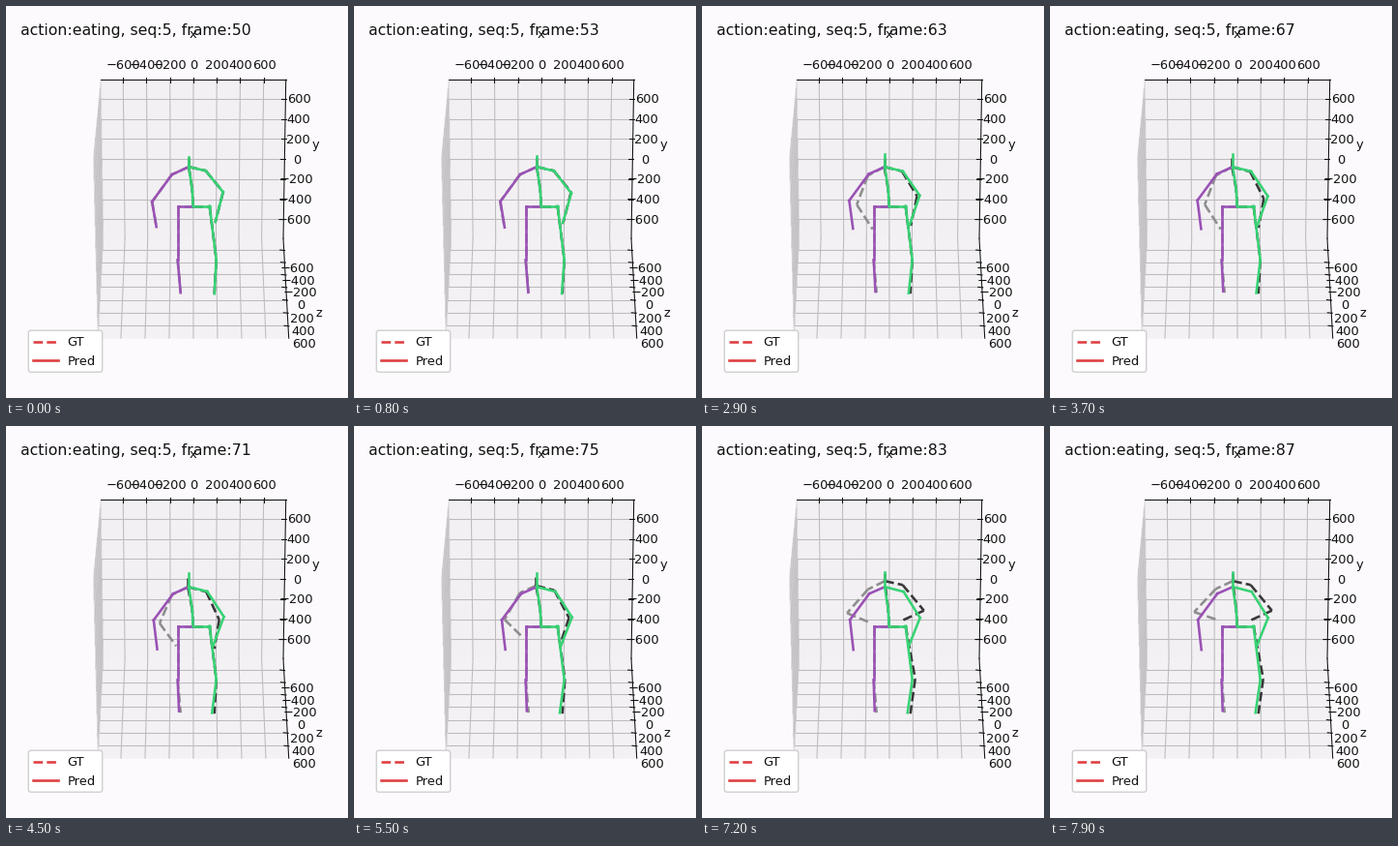
These frames come from a looping animation (354x405 px, 8000 ms). A matplotlib script:

```python
import numpy as np
import matplotlib.pyplot as plt
from matplotlib.animation import FuncAnimation
from matplotlib.patches import FancyBboxPatch, Polygon

W, H, DPI = 354, 405, 100
STEP, FRAMES = 100, 80
LOOP = STEP * FRAMES
PT = 72 / DPI
SMALL, LARGE = 13 * PT, 15.7 * PT
THIN, THICK = 1.05 * PT, 2.6 * PT
GRID, INK, RED = "#bdbbbe", "#111111", "#de3f42"
DASH = (0, (3.7, 1.6))

plt.rcParams["font.family"] = "DejaVu Sans"
fig = plt.figure(figsize=(W / DPI, H / DPI), dpi=DPI, facecolor="#fcfafd")
ax = fig.add_axes([0, 0, 1, 1])
ax.set_xlim(0.3, W + 0.3)
ax.set_ylim(H - 0.2, -0.2)
ax.axis("off")


def line(p, q, color=GRID, width=THIN, **kw):
    return ax.plot([p[0], q[0]], [p[1], q[1]], color=color, lw=width, **kw)[0]


def label(x, y, s, size=SMALL, ha="center"):
    return ax.text(x, y, s, fontsize=size, ha=ha, va="baseline",
                   color=INK, zorder=8)


def mix(p, q, f):
    return tuple(np.add(p, np.multiply(f, np.subtract(q, p))))


# Room corners: back wall, floor front edge, near top of the side wall
TL, TR = (98.5, 76), (290, 76)
BL, BR = (101, 240), (287.3, 240)
FL, FR = (95.5, 343), (293, 343)
NEAR = (90.8, 157)

ticks = np.arange(-600, 601, 200)
frac = (ticks + 790) / 1580
deep = frac - 0.05 * frac * (1 - frac)

for corners, color in (((TL, TR, BR, BL), "#f2f0f3"),
                       ((BL, BR, FR, FL), "#f3f1f4"),
                       ((TL, BL, FL, NEAR), "#dddbde")):
    ax.add_patch(Polygon(corners, fc=color, ec=color, lw=0.5, zorder=0))

for f, d in zip(frac, deep):
    line(mix(TL, TR, f), mix(BL, BR, f))
    line(mix(BL, BR, f), mix(FL, FR, f))
    line(mix(TL, BL, f), mix(TR, BR, f))
    line(mix(BL, FL, d), mix(BR, FR, d))
    line(mix(TL, BL, f), mix(NEAR, FL, f), alpha=0.6)
    line(mix(TL, NEAR, d), mix(BL, FL, d), alpha=0.6)

for p, q in ((TL, TR), (TR, BR), (BR, FR)):
    line(p, q, INK, zorder=3)


def number(v):
    return str(v).replace("-", "\u2212")


for i, (v, f, d) in enumerate(zip(ticks, frac, deep)):
    x, y = mix(TL, TR, f)
    line((x, y - 2), (x, y + 3), INK, zorder=3)
    label(194.6 + 24.4 * (i - 3), 65, number(v))

    x, y = mix(TR, BR, f)
    line((x - 4, y), (x + 1, y), INK, zorder=3)
    label(304 - 5 * i / 6, y + 4.5, number(-v))

    x, y = mix(BR, FR, d)
    line((x - 4, y), (x + 1, y + 0.5), INK, zorder=3)
    label(302 + 7 * i / 6, y + 23, number(v))

label(194, 33, "x")
label(321, 147, "y")
label(324, 321, "z")
title = label(15.5, 29.7, "", LARGE, "left")

ax.add_patch(FancyBboxPatch((26, 337.5), 71.5, 38, zorder=6,
                            boxstyle="round,pad=2.5,rounding_size=2.5",
                            fc="white", ec="#cccccc", lw=1.3 * PT))
for y, name, style in ((346.3, "GT", DASH), (366, "Pred", "-")):
    line((28.5, y), (54, y), RED, THICK, ls=style, zorder=7)
    label(64, y + 4.8, name, ha="left")

# Starting pose, and how far each movement carries a joint
REST = dict(
    pelvis=(194, 206.5), spine=(193, 189), neck=(189.5, 166), head=(189.5, 156),
    r_hip=(178, 206.5), r_knee=(178, 262), r_ankle=(181, 296),
    l_hip=(211, 206.5), l_knee=(218, 262), l_ankle=(216, 297),
    r_shoulder=(172, 174), r_elbow=(151.5, 202), r_wrist=(156, 228),
    l_shoulder=(207, 170), l_elbow=(225, 192), l_wrist=(217, 223))
DRIFT = dict(head=(0, -5), r_shoulder=(1.5, -1), r_elbow=(2, -2),
             r_wrist=(1, 3), l_shoulder=(2, 1), l_elbow=(1, 6),
             l_wrist=(-3, 5), r_ankle=(-2, -2), l_ankle=(-3, -1))
REACH = dict(head=(-1, 1), neck=(-1, 0), r_shoulder=(0, 1), r_elbow=(9, 3),
             r_wrist=(21, 2.5), l_shoulder=(0.5, 1), l_elbow=(-4, 8),
             l_wrist=(-1, 7))
LIFT = dict(head=(1, -5), neck=(1, -6), r_shoulder=(0, -7), r_elbow=(-11, -13),
            r_wrist=(-5, -31), l_shoulder=(0.5, -7), l_elbow=(9, -9.5),
            l_wrist=(-9, -29), l_knee=(3, -1))

RIGHT = ("pelvis r_hip r_knee r_ankle", "neck r_shoulder r_elbow r_wrist")
LEFT = ("pelvis l_hip l_knee l_ankle", "pelvis spine neck head",
        "neck l_shoulder l_elbow l_wrist")


def ease(t, start, end):
    u = np.clip((t - start) / (end - start), 0, 1)
    return u * u * (3 - 2 * u)


def moved(name, *moves):
    p = np.array(REST[name], float)
    for offsets, amount in moves:
        p += amount * np.array(offsets.get(name, (0, 0)))
    return p


def guess_joint(name, t):
    return moved(name, (DRIFT, 1 - (1 - t / LOOP) ** 2))


def true_joint(name, t):
    if name.startswith("r_"):
        reach, lift = ease(t, 1100, 2900), ease(t, 3600, 8000)
    else:
        reach, lift = ease(t, 1200, 4500), ease(t, 4800, 7200)
    return moved(name, (REACH, reach), (LIFT, lift))


def skeleton(joint, right, left, style, z):
    bones = []
    for chains, color in ((RIGHT, right), (LEFT, left)):
        for chain in map(str.split, chains):
            for a, b in zip(chain, chain[1:]):
                art = line((0, 0), (0, 0), color, THICK, ls=style, zorder=z)
                bones.append((joint, a, b, art))
    return bones


bones = (skeleton(true_joint, "#8e8e8e", "#383838", DASH, 4)
         + skeleton(guess_joint, "#9a52b5", "#38d274", "-", 5))


def draw(i):
    t = i * STEP
    title.set_text(f"action:eating, seq:5, frame:{50 + (t + 13) // 213}")
    pose_time = t if t >= 200 else 0
    for joint, a, b, art in bones:
        art.set_data(*zip(joint(a, pose_time), joint(b, pose_time)))
    return []


anim = FuncAnimation(fig, draw, frames=FRAMES, interval=STEP,
                     init_func=lambda: draw(0), repeat=True, repeat_delay=0)
plt.show()
```
